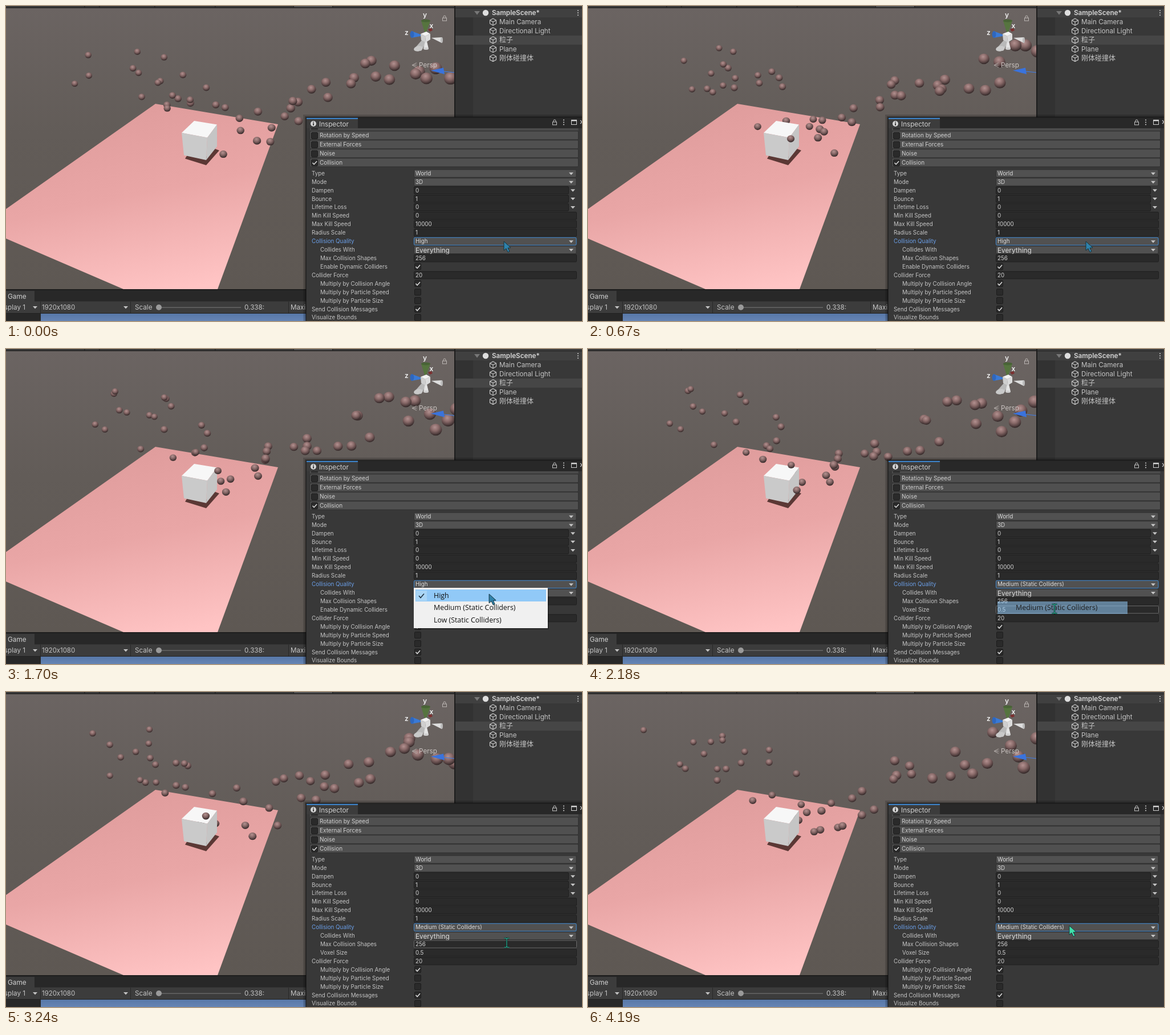
Animation of 1010 by 554 pixels, one loop 4.25 s. Source, as an HTML page:

```html
<!DOCTYPE html>
<html lang="en">
<head>
<meta charset="utf-8">
<title>Particle collision</title>
<style>
  html, body { margin: 0; width: 100%; height: 100%; overflow: hidden; background: #282828; }
  svg { display: block; font-family: Inter, "Noto Sans CJK SC", "Noto Sans CJK", sans-serif; }
  .menu { font-family: "Open Sans", "Noto Sans", sans-serif; }
</style>
</head>
<body>
<svg id="stage" width="1010" height="554" viewBox="0 0 1010 554"></svg>
<script>
const LOOP = 4250, TICK = 66.4, LIFE = 5, RATE = 10;
const PAUSE = 1220, RESUME = 2040;
const DARK = '#282828', PANEL = '#383838', FIELD = '#2a2a2a', DROP = '#515151', TEXT = '#c4c4c4', FOCUS = '#3f8bd6';

// ---- drawing helpers ----
const rect = (x, y, w, h, fill, more = '') =>
  `<rect x="${x}" y="${y}" width="${w}" height="${h}" fill="${fill}" ${more}/>`;
const text = (x, y, s, size = 9.8, fill = TEXT, more = '') =>
  `<text x="${x}" y="${y}" font-size="${size}" fill="${fill}" ${more}>${s}</text>`;
const poly = (points, fill, more = '') => `<polygon points="${points}" fill="${fill}" ${more}/>`;
const path = (d, stroke, width = 1, more = '') =>
  `<path d="${d}" fill="none" stroke="${stroke}" stroke-width="${width}" ${more}/>`;
const dot = (x, y, r, fill, more = '') => `<circle cx="${x}" cy="${y}" r="${r}" fill="${fill}" ${more}/>`;
const oval = (x, y, rx, ry, fill, more = '') =>
  `<ellipse cx="${x}" cy="${y}" rx="${rx}" ry="${ry}" fill="${fill}" ${more}/>`;
const group = (id, body, more = '') => `<g id="${id}" ${more}>${body}</g>`;
const arrow = (x, y) => poly(`${x - 4},${y - 2} ${x + 4},${y - 2} ${x},${y + 2.5}`, TEXT);
const check = (x, y, on) =>
  rect(x - 5.5, y - 5.5, 11, 11, FIELD, 'rx="1.5" stroke="#1c1c1c"') +
  (on ? path(`M${x - 3.5} ${y}l2.6 2.8l5-5.6`, '#dcdcdc', 1.5) : '');
const lock = (x, y, color) =>
  rect(x - 3.5, y - 1, 7, 5, 'none', `stroke="${color}"`) + path(`M${x - 2} ${y - 1}v-2a2 2 0 0 1 4 0v2`, color);
const dots = (x, y) => [-4, 0, 4].map(d => dot(x, y + d, 1.1, TEXT)).join('');

// ---- 3D view ----
const defs = `<defs>
  <linearGradient id="sky" x2="0" y2="1">
    <stop stop-color="#6b6462"/><stop offset=".45" stop-color="#625c58"/><stop offset="1" stop-color="#5e5853"/>
  </linearGradient>
  <linearGradient id="floor" gradientUnits="userSpaceOnUse" x1="235" y1="180" x2="300" y2="500">
    <stop stop-color="#e09d9d"/><stop offset=".45" stop-color="#e9a6a6"/><stop offset="1" stop-color="#ffc4c4"/>
  </linearGradient>
  <linearGradient id="gameSky" x2="0" y2="1"><stop stop-color="#5878a8"/><stop offset="1" stop-color="#6584b4"/></linearGradient>
  <radialGradient id="shade" cx=".43" cy=".3" r=".68">
    <stop stop-color="#b39190"/><stop offset=".45" stop-color="#896a69"/>
    <stop offset=".8" stop-color="#574343"/><stop offset="1" stop-color="#352929"/>
  </radialGradient>
  <circle id="ball" r="1" fill="url(#shade)"/>
</defs>`;

const ground = rect(0, 0, 788, 500, 'url(#sky)') +
  poly('262,172 477,208 371,498 206,498 0,409 0,357', 'url(#floor)') +
  poly('318,262 350,266 366,251 374,254 351,280 314,268.500', '#5b3835');

const box = poly('330,202 370,208.500 353,231.500 308,223', '#f7f7f7') +
  poly('308,223 353,231.500 351,271 312,262.500', '#cacaca') +
  poly('353,231.500 370,208.500 370,247 351,271', '#c5c5c5');

const gizmo =
  poly('743,45 740,41 746,39 748,43', '#7c3030') +
  poly('728,26 744,26 737,46 734,46', '#56743f') + oval(736, 26, 8, 2.6, '#486336') +
  poly('711,44 727,50 727,53 711,56', '#3a7ad6') + oval(712, 50, 3.5, 6, '#2f67bd') +
  poly('746,56 765,55 764,65', '#dedede') + oval(764, 60, 2, 5, '#bcbcbc') +
  poly('731,58 738,62 728,79 716,75', '#b9b9b9') + oval(723, 75, 8, 4.5, '#c9c9c9', 'transform="rotate(-12 723 75)"') +
  poly('735,62 738,62 741,75 732,75', '#e4e4e4') + oval(736.5, 75, 4.5, 2, '#cfcfcf') +
  poly('727,49 737,45 744,49 735,53', '#f2f2f2') + poly('727,49 735,53 736,64 728,60', '#cfcfcf') +
  poly('735,53 744,49 744,59 736,64', '#dcdcdc') +
  [['y', 731, 20], ['x', 742.5, 39], ['z', 699, 51]]
    .map(([s, x, y]) => text(x, y, s, 12, '#eee', 'font-weight="600"')).join('') +
  lock(769, 22, '#bbb6b3') +
  path('M720 100l-8 4l8 4M720 104h-7', '#b5aeab') + text(724, 108, 'Persp', 11.7, '#c9c3c0') +
  poly('745,113.500 767,108.500 769,120', '#3a73dc') + path('M768 115L786 117', '#3f7ee8', 1.2);

// ---- editor panels ----
const topStrip = rect(0, 0, 788, 3, '#3a3a3a') + rect(0, 2.5, 788, 1.2, '#191919') +
  [137, 163, 260, 366, 504, 572].map(x => rect(x, 0, 1.5, 3, '#242424')).join('') + rect(505, 0, 67, 2, '#555');

const cubeIcon = (x, y) =>
  path(`M${x} ${y - 6}l5.500 3v6l-5.500 3l-5.500-3v-6zM${x - 5.5} ${y - 3}l5.500 3l5.500-3M${x} ${y}v6`, '#c8c8c8', 1.1);
const hierarchy = rect(786, 0, 224, 200, '#1c1c1c') + rect(788, 0, 222, 200, PANEL) +
  rect(788, 0, 31, 200, '#323232') + rect(788, 0, 222, 4, '#3c3c3c') + rect(788, 3, 222, 1, '#222') +
  rect(788, 4, 222, 16, '#404040') + rect(788, 52, 222, 16, '#464646') +
  poly('821,9 831,9 826,15.500', '#777') + dot(841, 12, 5.2, '#dedede') +
  text(852, 16, 'SampleScene*', 11.7, '#d6d6d6', 'font-weight="600"') + dots(1003, 12) +
  ['Main Camera', 'Directional Light', '粒子', 'Plane', '刚体碰撞体'].map((s, i) =>
    cubeIcon(854, 28 + i * 15.9) + text(865, 32 + i * 15.9, s, s < 'z' ? 11.7 : 12)).join('');

const gameView = rect(0, 498, 530, 56, DARK) + rect(0, 498, 530, 1.5, '#191919') +
  rect(0, 501, 50, 19, '#3c3c3c') + text(3, 515, 'Game', 11.8, '#d0d0d0') +
  rect(0, 519.5, 530, 21, '#3c3c3c') + rect(0, 540, 530, 1, '#222') +
  [60, 218, 495].map(x => rect(x, 520, 1, 20, '#292929')).join('') +
  text(34, 534, 'Display 1', 11.7, TEXT, 'text-anchor="end"') + arrow(51, 530) +
  text(63, 534, '1920x1080', 11.4) + arrow(210, 530) + text(226, 534, 'Scale', 11.7) +
  rect(268, 529.5, 144, 1.5, '#666') + dot(268, 530, 5, '#9a9a9a') +
  text(418, 534, '0.338:', 11.7) + text(499, 534, 'Maxi', 11.7) + rect(61, 541, 470, 13, 'url(#gameSky)');

const rowY = i => 294.3 + i * 14.92;
const label = (i, s, indent, fill) => text(indent ? 551 : 536, rowY(i) + 3.5, s, 9.8, fill);
const input = (i, s, w = 286) =>
  rect(715.5, rowY(i) - 6.5, w - 1, 13, FIELD, 'rx="1.5" stroke="#1f1f1f"') + text(718, rowY(i) + 3.5, s, 9.8, '#d2d2d2');
const select = (i, s, size = 9.8, line = '#303030') =>
  rect(715.5, rowY(i) - 6.5, 284.5, 13.5, DROP, `rx="2" stroke="${line}"`) + arrow(991, rowY(i) + .5) +
  text(718, rowY(i) + (size > 10 ? 5 : 3.5), s, size, '#dcdcdc');
const curve = (i, s) => input(i, s, 272) + arrow(994, rowY(i));
const toggle = (i, on) => check(722, rowY(i), on);

const sections = ['Rotation by Speed', 'External Forces', 'Noise', 'Collision'].map((s, i) => {
  const y = 220 + i * 15.9;
  return rect(533, y, 470.5, 15, '#505050', 'rx="1.5" stroke="#2d2d2d" stroke-width=".8"') +
    check(541, y + 8, i == 3) + text(550, y + 11.3, s, 10, '#d0d0d0');
}).join('');

const inspector = rect(521, 191, 495, 370, '#000', 'opacity=".16"') + rect(524, 194, 490, 366, '#000', 'opacity=".3"') +
  rect(526, 195.5, 490, 360, '#1f1f1f') + rect(527, 197, 490, 18, DARK) +
  rect(527, 197.5, 90, 18, '#3c3c3c') + rect(527, 196.8, 90, 2, FOCUS) +
  dot(539, 207, 5, '#d4d4d4') + rect(538.2, 206, 1.8, 4, '#333') + rect(538.2, 203.6, 1.8, 1.5, '#333') +
  text(549, 211.5, 'Inspector', 11.7, '#d2d2d2') + lock(962, 205, TEXT) + dots(978, 204.5) +
  rect(991.5, 200.5, 9, 8, 'none', 'stroke="#d0d0d0"') + rect(991, 200, 10, 2.5, '#d0d0d0') +
  path('M1007 201l6 6M1007 207l6-6', '#d0d0d0', 1.2) +
  rect(527, 215, 490, 340, PANEL) + rect(533, 215, 470.5, 4, '#4b4b4b') + rect(535, 215, 12, 2.5, FIELD) + sections +
  ['Type', 'Mode', 'Dampen', 'Bounce', 'Lifetime Loss', 'Min Kill Speed', 'Max Kill Speed', 'Radius Scale']
    .map((s, i) => label(i, s)).join('') +
  select(0, 'World') + select(1, '3D') + curve(2, '0') + curve(3, '1') + curve(4, '0') +
  input(5, '0') + input(6, '10000') + input(7, '1') +
  label(8, 'Collision Quality', 0, '#6b9fe8') +
  group('high', select(8, 'High', 9.8, FOCUS)) +
  group('medium', select(8, 'Medium (Static Colliders)', 9.8, FOCUS)) +
  label(9, 'Collides With', 1) + select(9, 'Everything', 11.8) +
  label(10, 'Max Collision Shapes', 1) + input(10, '256') +
  group('dynamic', label(11, 'Enable Dynamic Colliders', 1) + toggle(11, 1)) +
  group('voxel', label(11, 'Voxel Size', 1) + input(11, '0.5')) +
  label(12, 'Collider Force') + input(12, '20') +
  label(13, 'Multiply by Collision Angle', 1) + toggle(13, 1) +
  label(14, 'Multiply by Particle Speed', 1) + toggle(14) +
  label(15, 'Multiply by Particle Size', 1) + toggle(15) +
  label(16, 'Send Collision Messages') + toggle(16, 1) +
  label(17, 'Visualize Bounds') + toggle(17) +
  group('hover', rect(715.5, -6.5, 285, 13, 'none', 'rx="1.5" stroke="#6c6c6c"'));

const item = (y, s) => text(750, y, s, 12.4, '#111');
const medium = 'Medium (Static Colliders)';
const popup = group('popup',
  rect(720, 423, 232, 70, '#000', 'opacity=".3"') + rect(715, 420, 235, 71, '#f0f0f0') +
  group('markHigh', rect(718, 423, 229, 21, '#91c9f7')) + group('markMedium', rect(718, 444, 229, 22, '#91c9f7')) +
  rect(719, 425, 19, 18, '#a9d5f5') + path('M724 434l3 3.500l6-7', '#1d2d3a', 1.5) +
  item(438, 'High') + item(459, medium) + item(481, 'Low (Static Colliders)'), 'class="menu"') +
  group('picked', rect(718, 444, 228, 22, '#91c9f7') + item(459, medium), 'class="menu"');

const beamShape = 'M-4.500-8h3.500l1 1l1-1h3.500M0-7V7M-4.500 8h3.500l1-1l1 1h3.500';
const pointer = group('cursor',
    group('tip', '<path d="M0 0V16L4 12.500L7 19L10 17.500L7 11.500L12 11Z" stroke="#17323b"/>') +
    group('beam', path(beamShape, '#0d1f1c', 2.6) + path(beamShape, '#2fcfae'))) +
  group('click', dot(0, 0, 12, '#cdbf1d', 'opacity=".9"'));

const stage = document.getElementById('stage');
stage.innerHTML = defs + ground + group('back', '') + box + group('front', '') + gizmo +
  topStrip + gameView + hierarchy + inspector + popup + pointer;
const $ = id => document.getElementById(id);
const show = (id, on) => $(id).style.display = on ? '' : 'none';

// ---- particles: thrown left, bounce once, rise towards the back ----
const rand = n => { const v = Math.sin(n * 127.1 + 31.7) * 43758.5453; return v - Math.floor(v); };
const fall = a => 100 + 10 * a + 16 * a * a;

const balls = Array.from({ length: 90 }, (_, n) => {
  const angle = rand(n) * 2 * Math.PI, spread = Math.sqrt(rand(n + 200));
  const sx = Math.cos(angle) * spread, sy = Math.sin(angle) * spread;
  const el = document.createElementNS('http://www.w3.org/2000/svg', 'use');
  el.setAttribute('href', '#ball');
  $(sy < .35 ? 'back' : 'front').prepend(el);
  return { el, sx, sy, born: n / RATE - LIFE, hit: 2.65 - .2 * sy + .3 * (rand(n + 400) - .5), lift: 1 - .5 * rand(n + 600) };
});

function moveBall(b, now) {
  const a = now - b.born;
  const alive = a >= 0 && a < LIFE;
  b.el.style.display = alive ? '' : 'none';
  if (!alive) return;
  const x = 815 - (190 * a - 12 * a * a) * (1 + .16 * b.sx);
  const drop = fall(Math.min(a, b.hit)) + b.sy * 40;
  const rise = a > b.hit ? (drop - 62) * b.lift * (1 - (1 - (a - b.hit) / 2.3) ** 2) : 0;
  const r = 5 + 6.5 * Math.exp(-.55 * a);
  b.el.setAttribute('transform', `translate(${x} ${drop - rise}) scale(${r * 1.05} ${r})`);
}

// ---- pointer and menu ----
const track = [[0, 873, 414], [1500, 873, 414], [1840, 818, 450], [2040, 818, 450], [2110, 818, 457],
  [2320, 818, 457], [2510, 878, 441], [3450, 878, 441], [3650, 846, 413], [3800, 844, 411], [LOOP, 844, 411]];
function lerp(keys, t) {
  const i = Math.max(1, keys.findIndex(k => k[0] >= t)), p = keys[i - 1], q = keys[i];
  const f = (t - p[0]) / (q[0] - p[0]);
  return q.slice(1).map((v, j) => p[j + 1] + (v - p[j + 1]) * f);
}

function draw(t) {
  const sim = t < PAUSE ? t : Math.max(PAUSE, t - RESUME + PAUSE);
  balls.forEach(b => moveBall(b, sim / 1000));

  const [x, y] = lerp(track, t);
  const chosen = t >= 2100, beam = chosen && t < 3540;
  const at = `translate(${x} ${y})`;
  $('cursor').setAttribute('transform', at);
  $('click').setAttribute('transform', at);
  $('tip').setAttribute('fill', chosen ? '#3fe0aa' : '#2f82ab');
  show('tip', !beam);
  show('beam', beam);
  show('click', t >= 1150 && t < 1300 || t >= 2030 && t < 2100);

  show('high', !chosen);
  show('dynamic', !chosen);
  show('medium', chosen);
  show('voxel', chosen);
  show('hover', beam);
  $('hover').setAttribute('transform', `translate(0 ${rowY(y > 450 ? 11 : 10)})`);

  show('popup', t >= 1190 && !chosen);
  $('popup').setAttribute('opacity', t < 1250 ? .33 : t < 1320 ? .7 : 1);
  show('markHigh', t >= 1570 && y < 444);
  show('markMedium', y >= 444);
  show('picked', chosen && t < 2360);
  $('picked').setAttribute('opacity', t < 2150 ? .8 : t < 2230 ? .55 : t < 2300 ? .3 : .1);
}

const start = performance.now();
function frame() {
  const t = (performance.now() - start) % LOOP;
  draw(Math.floor(t / TICK + .3) * TICK % LOOP);
  requestAnimationFrame(frame);
}
draw(0);
requestAnimationFrame(frame);
</script>
</body>
</html>
```
